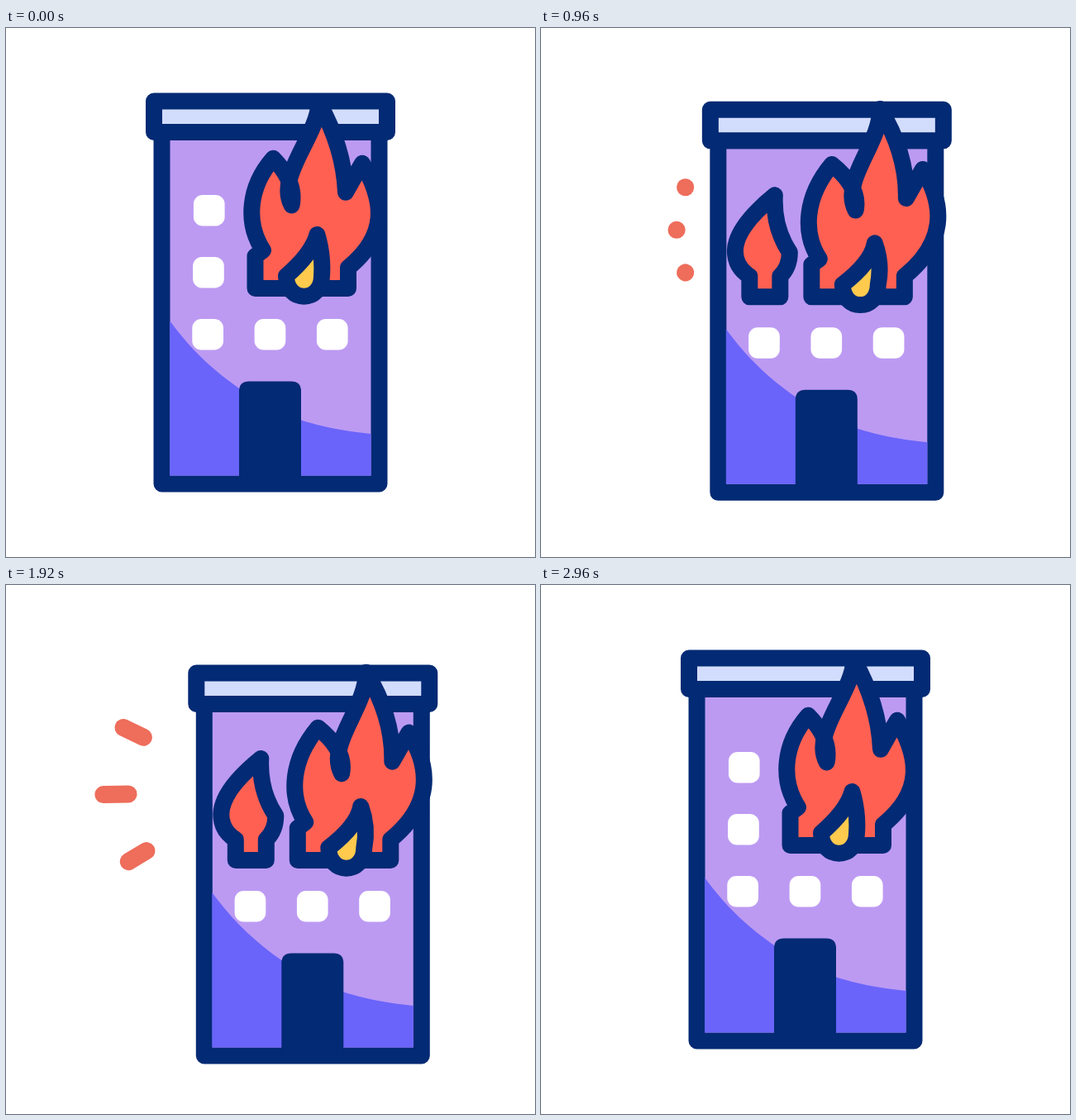
An HTML page for the animation above (3000 ms loop, 640 by 640 pixels).

```html
<!DOCTYPE html>
<html lang="en">
<head>
<meta charset="utf-8">
<title>Burning building</title>
<style>
html, body { margin: 0; width: 100%; height: 100%; overflow: hidden; background: #fff; }
svg { display: block; width: 100vw; height: 100vh; }
.line { stroke: #032a74; stroke-width: 20; stroke-linecap: round; stroke-linejoin: round; }
.none { fill: none; }
.red { fill: #ff6052; }
.yellow { fill: #ffca4d; }
.spark { stroke: #ee6d5b; stroke-width: 21; stroke-linecap: round; }
</style>
</head>
<body>
<svg viewBox="0 0 640 640">
  <defs><clipPath id="level"><rect id="levelBox" x="150" y="0" width="200" height="400"/></clipPath></defs>
  <g id="scene">
    <g id="sparks"></g>
    <rect class="line" x="188.500" y="126" width="263" height="425.500" fill="#bc9af2"/>
    <path d="M198 354C225 391 252 415 282 436C310 455 350 482 441.500 491V541.500H198Z" fill="#6a64fa"/>
    <path d="M282 552V439.500Q282 427.500 294 427.500H345Q357 427.500 357 439.500V552Z" fill="#032a74"/>
    <g id="windows" fill="#fff"></g>
    <rect class="line" x="179" y="88.500" width="282" height="37.500" fill="#d2dcfd"/>
    <path id="smallFill" class="red" clip-path="url(#level)"/>
    <path id="smallLine" class="line none" pathLength="1"/>
    <path id="flame" class="line red"/>
    <path id="drop" class="line yellow"/>
  </g>
</svg>
<script>
const LOOP = 3000, STEP = 40, BEAT = 320;
const $ = id => document.getElementById(id);
const svgNS = "http://www.w3.org/2000/svg";

function add(parent, tag, attrs) {
  const el = document.createElementNS(svgNS, tag);
  for (const k in attrs) el.setAttribute(k, attrs[k]);
  return parent.appendChild(el);
}

// One window per upper floor, a full row on the lowest
for (let row = 0; row < 3; row++)
  for (let col = 0; col < (row < 2 ? 1 : 3); col++)
    add($("windows"), "rect", {
      x: 225.3 + 75.3 * col + .8 * (2 - row), y: 202 + 75 * row, width: 37.7, height: 37.5, rx: 11
    });

const sides = [-1, 0, 1];
const sparkEls = sides.map(() => add($("sparks"), "line", { class: "spark" }));

// sway: sideways shift, curl: bend of the tongues, dip: how far the flame sinks
const rest = { sway: 8, curl: .8, dip: 1.2 };
const left = { sway: -3, curl: -1, dip: 1 };
const cycle = [
  { sway: 0, curl: 0, dip: 0 },
  { sway: 13, curl: 1, dip: .85 },
  { sway: 29, curl: -1, dip: 1 }
];

const mix = (a, b, k) => a + (b - a) * k;
const ramp = (t, a, b) => Math.min(1, Math.max(0, (t - a) / (b - a)));
const ease = (t, a, b) => { const k = ramp(t, a, b); return k * k * (3 - 2 * k); };

const beatPose = i => i === 0 ? rest : i === 1 ? left : cycle[(i + 1) % 3];

function poseAt(t) {
  if (t < 120 || t >= 2960) return rest;
  const i = Math.floor(t / BEAT);
  // The first beat starts late, after the hold
  const k = i === 0 ? ramp(t, 120, BEAT) : t / BEAT - i;
  const a = beatPose(i), b = beatPose(i + 1);
  return {
    sway: mix(a.sway, b.sway, k),
    curl: mix(a.curl, b.curl, k),
    dip: mix(a.dip, b.dip, k)
  };
}

const pt = (x, y) => ({ x, y, toString: () => x.toFixed(2) + " " + y.toFixed(2) });
const off = (p, x, y) => pt(p.x + x, p.y + y);
// Quadratic curve from a to b, bowed sideways
const bow = (a, b, dx) => `Q${pt((a.x + b.x) / 2 + dx, (a.y + b.y) / 2)} ${b}`;

function flamePath({ sway, curl, dip }) {
  const key = (x, y) => pt(x + sway, y + 9 * dip);
  const leftTip = key(308 + 6 * dip, 147), rightTip = key(423, 153), top = key(373 - 2 * dip, 80);
  const notch = key(352 - 12 * dip, 200 + 3 * dip), notch2 = key(403, 188);
  return `M301.5 315V276L311 269C290 237 ${286 + 8 * curl} 193 ${leftTip}` +
    bow(leftTip, notch, 4 + 16 * curl) +
    `C${off(notch, -19, -36)} ${off(top, -14 + 15 * curl, 36 + 6 * curl)} ${top}` +
    bow(top, notch2, 2 + 15 * curl) +
    bow(notch2, rightTip, -2 + 2 * curl) +
    `C${off(rightTip, 20 + 8 * curl, 45)} 463 250 414 290V315Z`;
}

function dropPath({ sway, curl }) {
  const tip = pt(372 + .15 * sway + 4 * curl, 250);
  return `M${tip}Q${off(tip, -15 + 11 * curl, 23)} 339 300C339 333 382 333 382 300` +
    `Q${off(tip, 1 + 8 * curl, 25)} ${tip}Z`;
}

function smallPath({ curl }) {
  const k = Math.max(0, curl);
  const tip = pt(274 - 17 * k, 190 + 2 * k);
  const west = pt(219 - 10 * k, 265 - 6 * k), east = pt(285 - 10 * k, 261);
  return `M${tip}Q${off(west, 1, -29)} ${west}Q${off(west, 0, 20)} 226.5 290V315H263.5V290` +
    `Q${off(east, 0, 18)} ${east}Q${off(tip, 2 - 4 * k, 39)} ${tip}`;
}

// The outline grows from the window sill up both sides
function drawSmall(t, pose) {
  const size = ease(t, 480, 900) * (1 - ease(t, 1920, 2400));
  const line = $("smallLine"), fill = $("smallFill");
  line.style.display = fill.style.display = size > .005 ? "inline" : "none";
  if (size <= .005) return;
  const d = smallPath(pose), cut = (1 - size) / 2;
  line.setAttribute("d", d);
  fill.setAttribute("d", d);
  line.style.strokeDasharray = size < 1 ? `${size} 2` : "none";
  line.style.strokeDashoffset = -cut;
  $("levelBox").setAttribute("y", size < 1 ? line.getPointAtLength(line.getTotalLength() * cut).y : 0);
}

function drawSparks(t, out) {
  const fade = ease(t, 1760, 2240);
  const head = .7 * out + .3 * fade, tail = Math.min(.26 * out + .74 * fade, head - .001);
  $("sparks").style.display = t >= 920 && t < 2300 ? "inline" : "none";
  sides.forEach((s, i) => {
    const x = k => mix(138.5 + 10.5 * s * s, 46 + 32 * s * s + 4 * s, k);
    const y = k => mix(234 + 51.5 * s, 236 + 89.5 * s, k);
    const ends = { x1: x(tail), y1: y(tail), x2: x(head), y2: y(head) };
    for (const name in ends) sparkEls[i].setAttribute(name, ends[name]);
  });
}

function draw(time) {
  const t = Math.floor(time % LOOP / STEP) * STEP;
  const hop1 = ease(t, 190, 690), hop2 = ease(t, 940, 1410), back = 1 - ease(t, 2300, 2960);
  const x = (25.7 * hop1 + 25.6 * hop2) * back, y = (10.3 * hop1 + 7.7 * hop2) * back;
  const pose = poseAt(t);
  $("scene").setAttribute("transform", `translate(${x} ${y})`);
  $("flame").setAttribute("d", flamePath(pose));
  $("drop").setAttribute("d", dropPath(pose));
  drawSmall(t, pose);
  drawSparks(t, hop2);
}

const start = performance.now();
function tick() {
  draw(performance.now() - start);
  requestAnimationFrame(tick);
}
tick();
</script>
</body>
</html>
```
